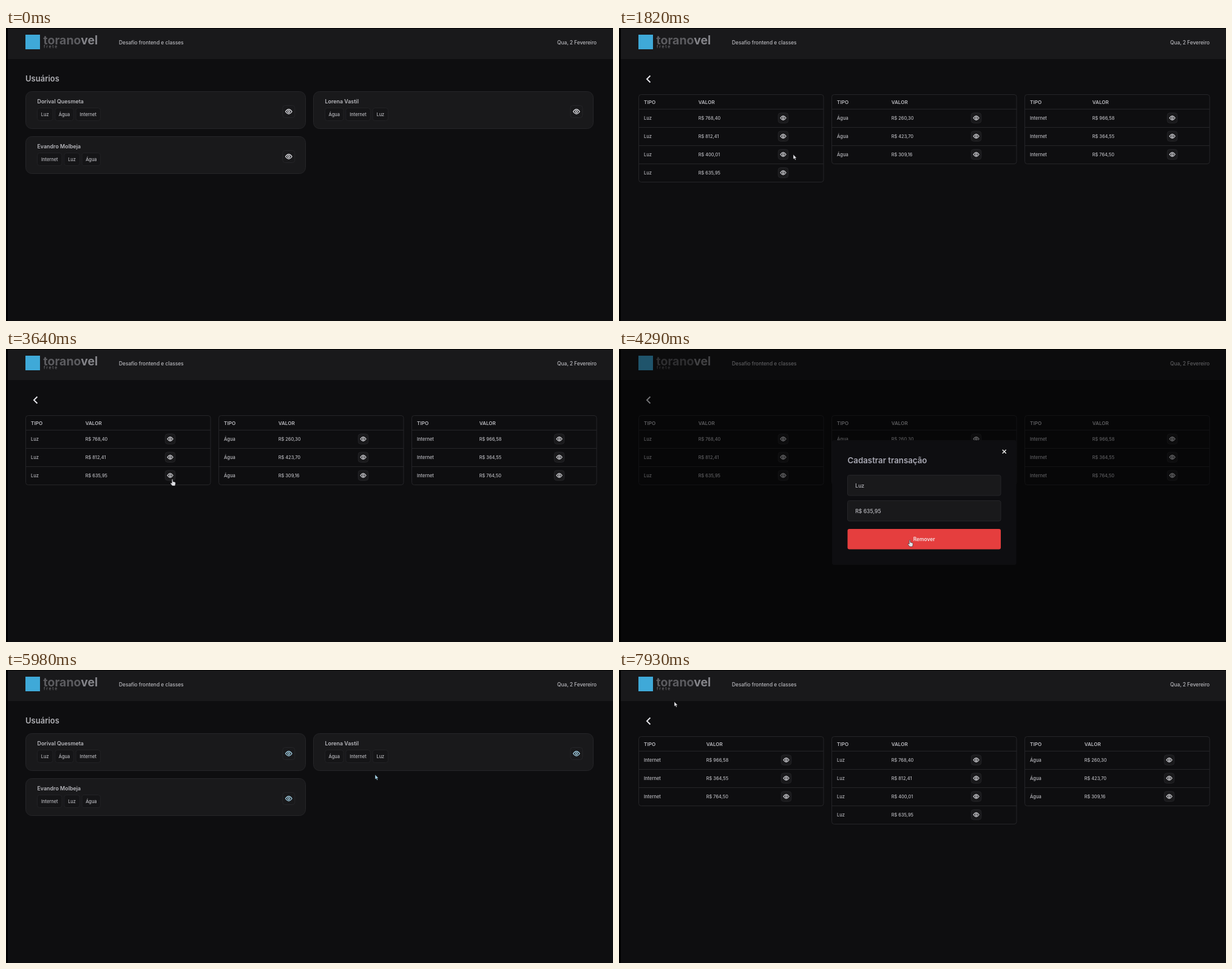
Write an HTML page that moves like this. It is 1000 by 482 pixels and loops after 8000 ms.

```html
<!DOCTYPE html>
<html lang="pt-BR">
<head>
<meta charset="utf-8">
<style>
  html, body { margin: 0; width: 100%; height: 100%; overflow: hidden; background: #000; }
  svg { display: block; width: 1000px; height: 482px; font-family: Inter, sans-serif; }
  .box { fill: #19191b; stroke: #252528; }
  .tag { fill: #151517; stroke: #222225; }
  .line { fill: none; stroke: #252528; }
</style>
</head>
<body>
<svg id="stage" viewBox="0 0 1000 482"></svg>
<script>
const LOOP = 8000, STEP = 130;
const BILLS = {
  Luz: ['768,40', '812,41', '400,01', '635,95'],
  Água: ['260,30', '423,70', '309,16'],
  Internet: ['966,58', '364,55', '764,50']
};
const TAG_WIDTH = { Luz: 25.5, Água: 30.5, Internet: 40.5 };
const USERS = [
  { name: 'Dorival Quesmeta', x: 32.5, y: 104.5, bills: ['Luz', 'Água', 'Internet'] },
  { name: 'Lorena Vastil', x: 506.5, y: 104.5, bills: ['Água', 'Internet', 'Luz'] },
  { name: 'Evandro Molbeja', x: 32.5, y: 178.5, bills: ['Internet', 'Luz', 'Água'] }
];
// Each dialog removes one electricity bill when it closes.
const DIALOGS = [
  { open: 2080, close: 2990, value: '400,01' },
  { open: 3770, close: 4420, value: '635,95' }
];
// Pointer keys: time, x, y
const POINTER = [
  [130, 500, 392], [780, 466, 137], [1300, 466, 137], [1820, 287, 208],
  [1950, 271, 208], [2080, 271, 208], [2730, 479, 314], [2990, 479, 314],
  [3510, 274, 214], [3770, 274, 214], [4290, 479, 314], [4420, 479, 314],
  [4940, 148, 148], [5200, 48, 84], [5460, 48, 84], [5980, 608, 172],
  [6240, 466, 212], [6630, 466, 212], [7280, 230, 140], [7540, 130, 64],
  [7670, 130, 64], [7930, 91, 52]
];

const clamp = v => Math.max(0, Math.min(1, v));
const rect = (x, y, w, h, r, cls) =>
  `<rect x="${x}" y="${y}" width="${w}" height="${h}" rx="${r}" class="${cls}"/>`;
const text = (x, y, s, size, fill = '#b9b9be', weight = 500, extra = '') =>
  `<text x="${x}" y="${y}" font-size="${size}" fill="${fill}" font-weight="${weight}" ${extra}>${s}</text>`;

function eye(x, y, size, scale, colour) {
  return rect(x - size / 2, y - size / 2, size, size, 4, 'box') +
    `<g transform="translate(${x} ${y}) scale(${scale})" fill="none" stroke="${colour}" stroke-width="1.3">
      <path d="M-5.3 0Q0-7.6 5.3 0Q0 7.6-5.3 0Z"/><circle r="1.7"/></g>`;
}

function header() {
  return `<path d="M3 1H1000V482H3Z" fill="#0e0e10"/><path d="M3 1H1000V51H3Z" fill="#19191b"/>
    <rect x="32" y="11" width="24" height="24" fill="#3fa9d8"/>` +
    text(61.5, 27, 'torano<tspan fill="#85858a">vel</tspan>', 19.5, '#5c5c60', 700) +
    text(62, 33, 'frete', 7, '#77777b', 400, 'letter-spacing="1.7"') +
    text(186, 27, 'Desafio frontend e classes', 8.4) +
    text(973, 27, 'Qua, 2 Fevereiro', 8.3, '#b9b9be', 500, 'text-anchor="end"');
}

function userCard({ name, x, y, bills }, colour) {
  let left = x + 19;
  const tags = bills.map(bill => {
    const w = TAG_WIDTH[bill];
    const tag = rect(left, y + 27, w, 21, 4, 'tag') +
      text(left + w / 2, y + 40, bill, 7.4, '#b9b9be', 500, 'text-anchor="middle"');
    left += w + 3.8;
    return tag;
  }).join('');
  return rect(x, y, 461, 61, 10, 'box') + text(x + 19, y + 19.7, name, 8.9, '#b9b9be', 600) +
    tags + eye(x + 433.3, y + 33, 20, 1, colour);
}

const usersPage = colour => text(32, 88.3, 'Usuários', 13, '#b0b0b5', 600) +
  USERS.map(user => userCard(user, colour)).join('');

function table(bill, column, removed) {
  const x = 32.5 + column * 318, values = BILLS[bill].filter(v => !removed.includes(v));
  const valueX = x + (bill === 'Internet' ? 111.3 : 98.2);
  const eyeX = x + (bill === 'Internet' ? 243 : 238);
  let out = rect(x, 109.5, 304.5, 24 + 30 * values.length, 4, 'line') +
    text(x + 8.5, 124.5, 'TIPO', 8.2, '#b9b9be', 600) + text(valueX, 124.5, 'VALOR', 8.1, '#b9b9be', 600);
  values.forEach((value, i) => {
    const y = 148 + i * 30;
    out += `<path class="line" d="M${x} ${y - 14.5}h304.5"/>` +
      text(x + 8.5, y + 2.7, bill, 7.5) + text(valueX, y + 2.7, 'R$ ' + value, 7.4) +
      eye(eyeX, y, 16.5, 0.88, '#e1e1e6');
  });
  return out;
}

const billsPage = (bills, removed) =>
  '<path d="M51.5 78.5L46 84L51.5 89.5" fill="none" stroke="#e1e1e6" stroke-width="2"/>' +
  bills.map((bill, i) => table(bill, i, removed)).join('');

function dialog({ open, close, value }, t) {
  const opacity = Math.min(clamp((t - open) / 200), clamp(1 - (t - close) / 200));
  if (!opacity) return '';
  return `<g opacity="${opacity}"><path d="M0 0H1000V482H0Z" opacity=".5"/>
    <rect x="351" y="150" width="303.5" height="205" rx="3" fill="#0e0e11"/>
    <path d="M631.7 165.7l6 6m0-6l-6 6" stroke="#eee" stroke-width="1.4"/>` +
    text(376.5, 188, 'Cadastrar transação', 13.3, '#a8a8b3', 600) +
    rect(376.5, 207.5, 252.5, 33.5, 3, 'box') + text(389.3, 227.5, 'Luz', 8.6) +
    rect(376.5, 249.5, 252.5, 33.5, 3, 'box') + text(389.3, 269.5, 'R$ ' + value, 8.6) +
    '<rect x="376.5" y="296" width="252.5" height="33.5" rx="3" fill="#e53e3e"/>' +
    text(502.7, 316, 'Remover', 8.4, '#f3e6e6', 600, 'text-anchor="middle"') + '</g>';
}

function pointer(t, colour) {
  if (t < POINTER[0][0]) return '';
  const next = POINTER.findIndex(key => key[0] > t);
  const b = POINTER.at(next), a = next < 1 ? b : POINTER[next - 1];
  const u = a === b ? 1 : (t - a[0]) / (b[0] - a[0]), ease = u * u * (3 - 2 * u);
  const x = a[1] + (b[1] - a[1]) * ease, y = a[2] + (b[2] - a[2]) * ease;
  const targets = [[466, 137], [271, 208], [274, 214], [479, 314], [48, 84], [466, 212]];
  const hand = targets.some(([px, py]) => Math.hypot(px - x, py - y) < 8);
  const shape = hand
    ? 'M-.8 .8Q0-.6 .9 .8V4L4 4.8Q5.6 5.2 5.3 7L4.6 11H-.2L-3 7.2Q-3.2 5.6-1.8 6.2L-.8 7Z'
    : 'M0 0V8L1.9 6.4L3.2 9.3L4.6 8.6L3.3 5.9H5.7Z';
  return `<path transform="translate(${x} ${y})" d="${shape}" fill="${colour}" stroke="#111" stroke-width=".5"/>`;
}

function scene(t) {
  const second = t >= 5330;
  const colour = second && t < 6500 ? '#a3d1e6' : '#e1e1e6';
  let page;
  if (t < 1040 || (second && t < 6500)) page = usersPage(colour);
  else {
    const removed = second ? [] : DIALOGS.filter(d => t >= d.close).map(d => d.value);
    page = billsPage(USERS[second ? 2 : 0].bills, removed);
  }
  return header() + page + DIALOGS.map(d => dialog(d, t)).join('') + pointer(t, colour);
}

const stage = document.getElementById('stage');
let shown = -1;
function tick() {
  const t = Math.floor(performance.now() % LOOP / STEP) * STEP;
  if (t !== shown) stage.innerHTML = scene(shown = t);
  requestAnimationFrame(tick);
}
tick();
</script>
</body>
</html>
```
